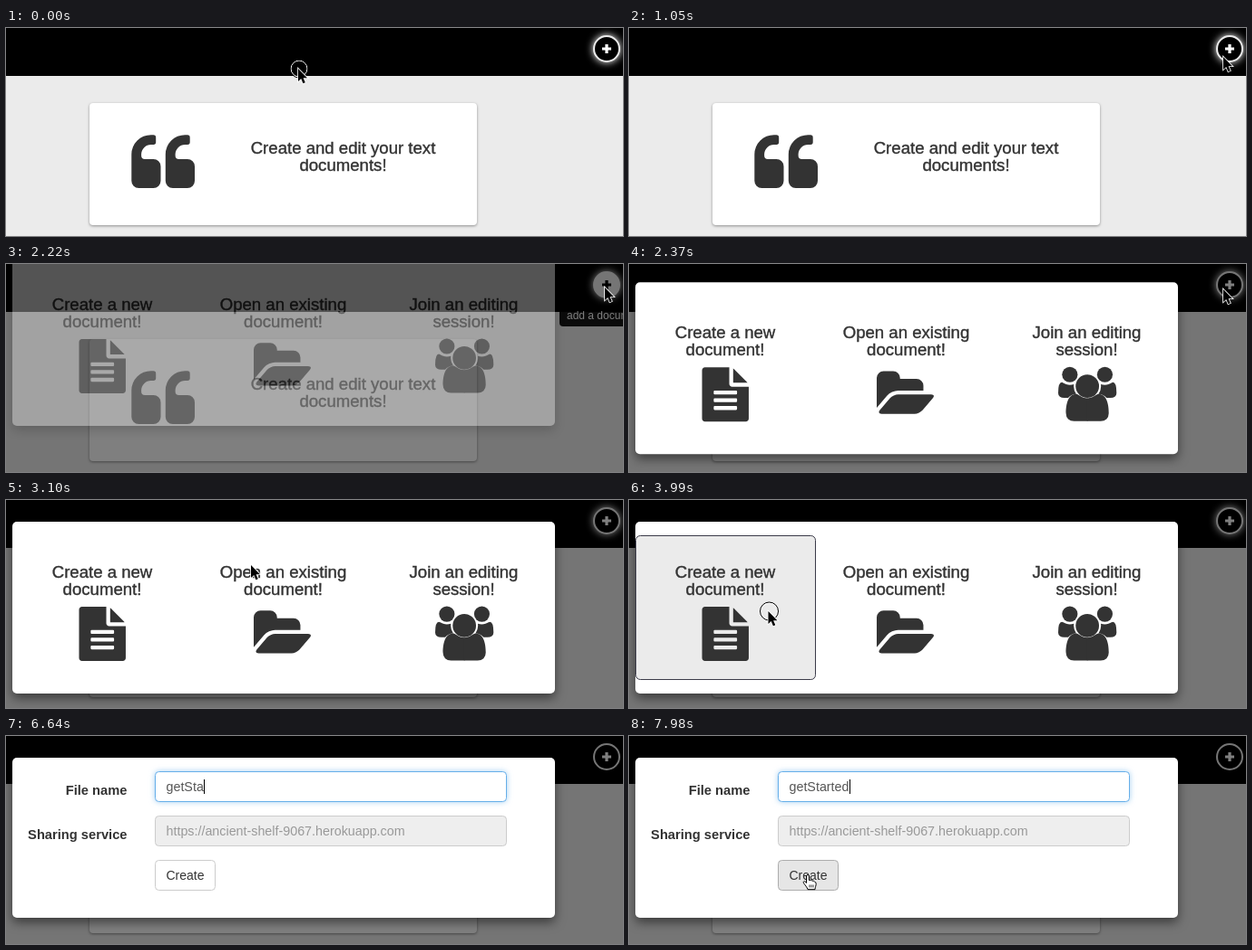
An HTML page for the animation above (8000 ms loop, 680 by 230 pixels).

```html
<!DOCTYPE html>
<html lang="en">
<head>
<meta charset="utf-8">
<title>Create a document</title>
<style>
html, body { margin: 0; width: 100%; height: 100%; overflow: hidden; background: #ebebeb; }
svg { display: block; width: 680px; height: 230px; font: 14.3px "Liberation Sans", Arial, sans-serif; }
.head { font-size: 18.6px; text-anchor: middle; fill: #333; stroke: #333; stroke-width: .4px; }
.label { font-size: 14.7px; font-weight: bold; text-anchor: end; fill: #333; }
.icon { fill: #333; }
.card { fill: #fff; filter: drop-shadow(0 1px 1.5px rgba(0,0,0,.4)); }
.panel { fill: #fff; filter: drop-shadow(0 5px 6px rgba(0,0,0,.5)); }
.glow { filter: drop-shadow(0 0 4px #fff); }
.field { fill: #fff; stroke: #ccc; }
.field.focus { stroke: #66afe9; filter: drop-shadow(0 0 3px rgba(102,175,233,.6)); }
</style>
</head>
<body>
<svg viewBox="0 0 680 230">
  <defs>
    <path id="mark" d="M32.2 34.9v16a8 8 0 0 1-8 8H8a8 8 0 0 1-8-8V21.5A21.5 21.5 0 0 1 21.5 0h2.7a2.7 2.7 0 0 1 2.7 2.7v5.4a2.7 2.7 0 0 1-2.7 2.7h-2.7a10.7 10.7 0 0 0-10.7 10.7v1.3a4 4 0 0 0 4 4h9.4a8 8 0 0 1 8 8z"/>
    <g id="halfUsers">
      <circle cx="384" cy="256" r="256"/>
      <path d="M593 896q-162 5-265 128h-134q-82 0-138-40.5t-56-118.5q0-353 124-353 6 0 43.5 21t97.5 42.5 119 21.5q67 0 133-23-5 37-5 66 0 139 81 256z"/>
      <path d="M970 1792H523q-121 0-194-69.5t-73-189.5c0-330 80-637 346-637 60 0 160 139 368 139z"/>
    </g>
  </defs>

  <rect width="680" height="230" fill="#ebebeb"/>
  <rect width="680" height="53" fill="#000"/>
  <rect class="card" x="92" y="83" width="427" height="135" rx="4"/>
  <g class="icon" transform="translate(138.3 118.2)"><use href="#mark"/><use href="#mark" x="37.5"/></g>
  <g class="head"><text x="371.5" y="139">Create and edit your text</text><text x="371.5" y="158">documents!</text></g>

  <circle id="plusRing" cx="662" cy="23" r="14" stroke="#ebebeb" stroke-width="2"/>
  <path id="plusSign" d="M657 23h10m-5-5v10" stroke-width="3.2"/>
  <g id="tip" opacity=".9">
    <rect x="610" y="46" width="100" height="23" rx="4"/>
    <text x="618" y="61" font-size="12" fill="#fff">add a document</text>
  </g>
  <rect id="backdrop" width="680" height="230"/>

  <g id="modal">
    <rect id="panel" class="panel" x="7" y="24" width="598" rx="5"/>
    <g id="choices">
      <rect id="choiceHover" x="7.5" y="39.5" width="198" height="159" rx="5" fill="#ebebeb" stroke="#3a3a48"/>
      <g class="head">
        <text x="106" y="86">Create a new</text><text x="106" y="105">document!</text>
        <text x="305.5" y="86">Open an existing</text><text x="305.5" y="105">document!</text>
        <text x="504.5" y="86">Join an editing</text><text x="504.5" y="105">session!</text>
      </g>
      <g class="icon">
        <path fill-rule="evenodd" transform="translate(80.5 118) scale(.0335)" d="M1024 512V40q22 14 36 28l408 408q14 14 28 36zM896 544q0 40 28 68t68 28h544v1056q0 40-28 68t-68 28H96q-40 0-68-28t-28-68V96q0-40 28-68t68-28h800zM384 800v64q0 32 32 32h704q32 0 32-32v-64q0-32-32-32H416q-32 0-32 32zm0 256v64q0 32 32 32h704q32 0 32-32v-64q0-32-32-32H416q-32 0-32 32zm0 256v64q0 32 32 32h704q32 0 32-32v-64q0-32-32-32H416q-32 0-32 32z"/>
        <path transform="translate(273 118) scale(.0335)" d="M1879 952q0 31-31 66l-336 396q-43 51-120.5 86.5t-143.5 35.5h-1088q-34 0-60.5-13t-26.5-43q0-31 31-66l336-396q43-51 120.5-86.5t143.5-35.5h1088q34 0 60.5 13t26.5 43zm-343-344v160h-832q-94 0-197 47.5t-164 119.5l-342 402q-1-12-1-25v-960q0-92 66-158t158-66h320q92 0 158 66t66 158v32h544q92 0 158 66t66 158z"/>
        <g transform="translate(473 117.5) scale(.0335)">
          <use href="#halfUsers"/><use href="#halfUsers" transform="translate(1920) scale(-1 1)"/>
          <circle cx="960" cy="640" r="384"/>
        </g>
      </g>
    </g>
    <g id="form">
      <text class="label" x="133.5" y="65">File name</text>
      <text class="label" x="133.5" y="114">Sharing service</text>
      <rect id="nameField" class="field" x="164.5" y="39.5" width="387" height="33" rx="4"/>
      <text id="nameText" x="176.5" y="61"></text>
      <path id="caret" stroke="#000" d="M0 48v16"/>
      <rect x="164.5" y="88.5" width="387" height="33" rx="4" fill="#eee" stroke="#ccc"/>
      <text x="176.5" y="110" fill="#999">https://ancient-shelf-9067.herokuapp.com</text>
      <rect id="button" x="164.5" y="137.5" width="66" height="33" rx="4"/>
      <text x="197.5" y="159" font-size="14" text-anchor="middle" fill="#333">Create</text>
    </g>
  </g>

  <g id="pointer">
    <g id="ring" fill="none"><circle cx="1" r="9" stroke="#fff"/><circle cx="1" r="10" stroke="#000"/></g>
    <path id="arrow" d="M0 0v14l3.2-3 2.2 5.2 2.4-1-2.2-5H10z" stroke="#fff" paint-order="stroke" stroke-width="1.6"/>
    <g id="hand" fill="#fff" stroke="#000">
      <path d="M-1.5 1.5a1.5 1.5 0 0 1 3 0V6q2.6-.8 3.4.6 2.2-.3 2.7 1.2 1.6.2 1.6 2c0 2.4-1 3.4-1.2 6.4H0C-.5 14-3 11.4-4.5 9.2c-1-1.6.6-2.6 1.8-1.5L-1.5 9z"/>
      <path d="M2 11v3m2-3v3m2-3v3" stroke-width=".8"/>
    </g>
    <path id="beam" fill="none" stroke="#000" d="M-3-7.5q3 0 3 2 0-2 3-2M0-6V7M-3 8q3 0 3-2 0 2 3 2M-1.5 3h3"/>
  </g>
</svg>
<script>
const LOOP = 8000, TICK = 147.7;   // the screen refreshes once per tick
const $ = id => document.getElementById(id);
const set = (id, attrs) => { for (const k in attrs) $(id).setAttribute(k, attrs[k]); };
const show = (id, on) => set(id, { display: on ? 'inline' : 'none' });
const clamp = v => Math.min(1, Math.max(0, v));

// pointer path: tick, x, y
const path = [
  [0, 322, 45], [1, 330, 50], [2, 370, 57], [3, 440, 60], [5, 590, 48], [7, 655, 32], [8, 660, 28],
  [14, 660, 28], [15, 660, 26], [16, 655, 28], [17, 600, 35], [18, 470, 50], [20, 270, 72],
  [21, 218.5, 81], [22, 175, 105], [23, 153.5, 123], [29, 153.5, 123], [30, 172, 110], [31, 212, 80],
  [32, 234, 64.5], [49, 234, 64.5], [50, 232, 70], [51, 222, 100], [52, 210, 130], [53, 200, 148], [54, 197, 153.5]
];
const typing = [37, 38, 39, 41, 43, 44, 45, 46, 47, 47];
const clicks = [0, 13, 27, 34];

function pointerAt(tick) {
  const i = path.findIndex(p => p[0] >= tick);
  if (i < 1) return path[i ? path.length - 1 : 0].slice(1);
  const [a, b] = [path[i - 1], path[i]];
  const f = (tick - a[0]) / (b[0] - a[0]);
  return [a[1] + (b[1] - a[1]) * f, a[2] + (b[2] - a[2]) * f];
}

function draw(tick) {
  const time = tick * TICK;
  const [x, y] = pointerAt(tick);
  const form = tick >= 28, focus = tick >= 34;
  const overPlus = tick >= 8 && tick < 16;
  const overButton = tick >= 50 && y > 137;

  set('plusRing', { fill: overPlus ? '#ebebeb' : '#000', class: focus ? '' : 'glow' });
  set('plusSign', { stroke: overPlus ? '#000' : '#fff' });
  show('tip', tick >= 9 && tick < 16);
  set('backdrop', { opacity: clamp((time - 2016) / 150) / 2 });

  const slide = clamp((time - 2166) / 300);
  set('modal', {
    opacity: clamp((time - 2166) / 150),
    transform: `translate(0 ${-55 * (1 - slide) ** 2.5})`
  });
  set('panel', { height: form ? 177 : 190 });
  show('choices', !form);
  show('choiceHover', tick >= 22);
  show('form', form);

  const typed = 'getStarted'.slice(0, typing.filter(k => k <= tick).length);
  const text = $('nameText');
  text.textContent = typed || 'default.txt';
  set('nameText', { fill: typed ? '#555' : '#999' });
  set('nameField', { class: focus ? 'field focus' : 'field' });
  show('caret', focus);
  const caretX = 177.5 + (typed ? Math.round(text.getComputedTextLength()) : 0);
  set('caret', { transform: `translate(${caretX} 0)` });
  set('button', { fill: overButton ? '#e6e6e6' : '#fff', stroke: overButton ? '#adadad' : '#ccc' });

  const shape = overButton || (overPlus && tick < 15) ? 'hand' : form && y < 73 ? 'beam' : 'arrow';
  for (const id of ['arrow', 'hand', 'beam']) show(id, id === shape);
  show('ring', clicks.includes(tick));
  show('pointer', tick < 37 || tick >= 50);
  set('pointer', { transform: `translate(${x} ${y})` });
}

function loop() {
  draw(Math.floor(performance.now() % LOOP / TICK));
  requestAnimationFrame(loop);
}
loop();
</script>
</body>
</html>
```
